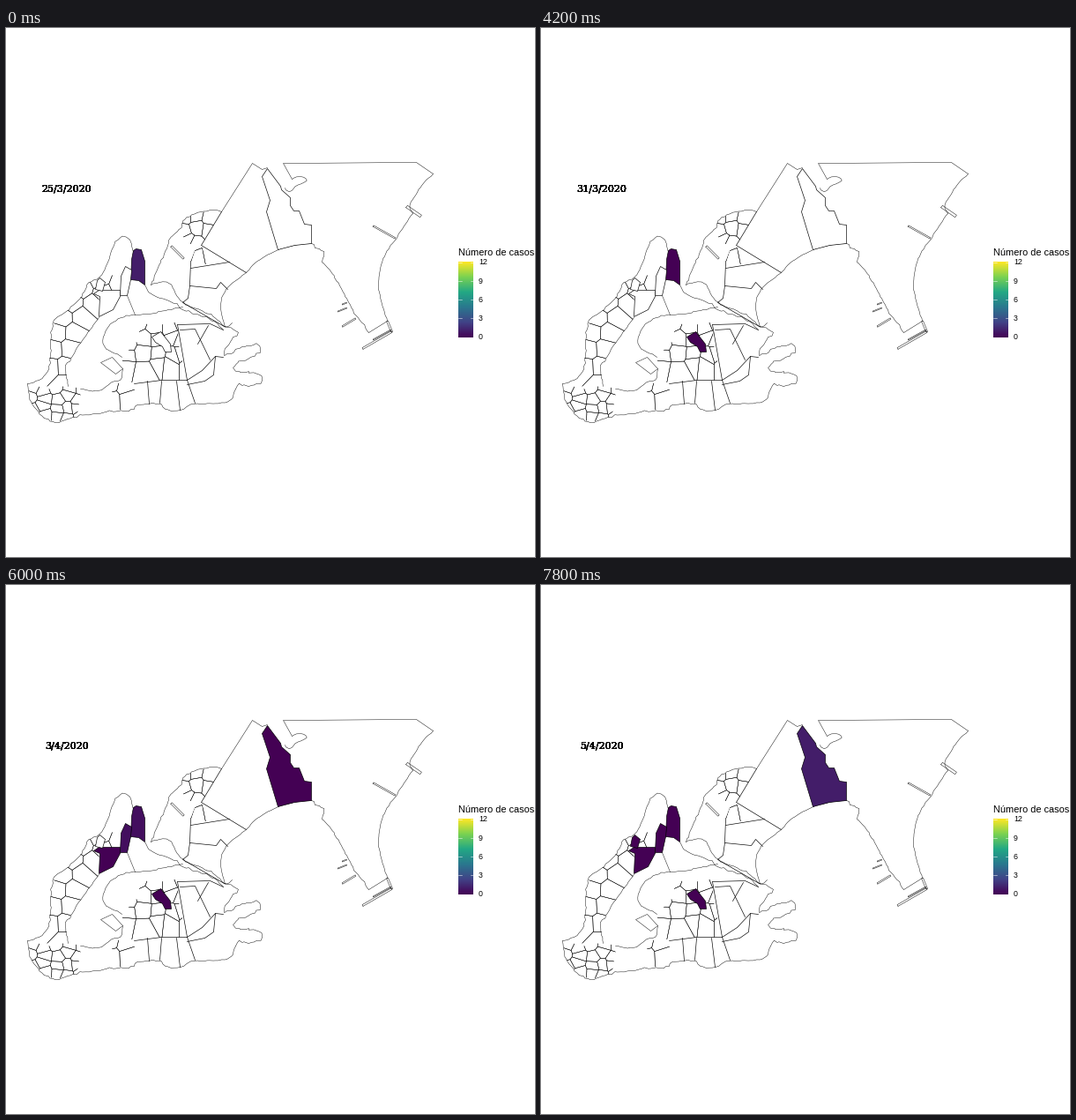
Recreate the animation shown at these times as a matplotlib script. Size 600 by 600 pixels, loop 8 s.

```python
import numpy as np
import matplotlib.pyplot as plt
from matplotlib.animation import FuncAnimation
from matplotlib.colors import LinearSegmentedColormap

PX = 0.72  # points per pixel at 100 dpi
FRAMES, STEP_MS = 40, 200
THIN, FIRM = 0.45 * PX, 0.65 * PX
rng = np.random.default_rng(11)

fig = plt.figure(figsize=(6, 6), dpi=100, facecolor="white")
ax = fig.add_axes([0, 0, 1, 1])


def pts(xy):
    return np.reshape(xy, (-1, 2)).astype(float)


def smooth(p):
    """Catmull-Rom curve through the points."""
    q = np.vstack([p[:1], p, p[-1:]])[:, None]
    a, b, c, d = q[:-3], q[1:-2], q[2:-1], q[3:]
    t = np.linspace(0, 1, 12)[None, :, None]
    s = (2 * b + (c - a) * t + (2 * a - 5 * b + 4 * c - d) * t**2
         + (3 * b - a - 3 * c + d) * t**3) / 2
    return s.reshape(-1, 2)


def resample(p, n):
    run = np.append(0, np.cumsum(np.hypot(*np.diff(p, axis=0).T)))
    at = np.linspace(0, run[-1], n)
    return np.column_stack([np.interp(at, run, p[:, k]) for k in (0, 1)])


def line(*xy, lw=FIRM):
    ax.plot(*pts(xy).T, color="black", lw=lw, zorder=2)


def shore(*xy, rough=0.5):
    """Natural coast: a curve with small seeded wiggles."""
    p = smooth(pts(xy))
    length = np.hypot(*np.diff(p, axis=0).T).sum()
    p = resample(p, int(length / 3.5) + 2)
    p[1:-1] += rng.normal(0, rough, p[1:-1].shape)
    line(*p.ravel(), lw=THIN)


def pier(x0, y0, x1, y1, w=2):
    d = np.array([x1 - x0, y1 - y0])
    n = np.array([-d[1], d[0]]) / np.hypot(*d) * w / 2
    a, b = np.array([x0, y0]), np.array([x1, y1])
    line(*np.ravel([a + n, b + n, b - n, a - n, a + n]), lw=THIN)


def area(*xy, lw=FIRM, z=3):
    return ax.add_patch(plt.Polygon(pts(xy), fc="white", ec="black", lw=lw,
                                    zorder=z))


def cut(poly, mid, normal):
    """Part of a polygon on the inner side of a line."""
    side = (poly - mid) @ normal
    out = []
    for i in range(len(poly)):
        a, b, sa, sb = poly[i - 1], poly[i], side[i - 1], side[i]
        if sa * sb < 0:
            out.append(a + (b - a) * sa / (sa - sb))
        if sb <= 0:
            out.append(b)
    return np.array(out)


def mesh(sites, *xy):
    """Parishes: nearest-site cells, cut off at the zone's outline."""
    zone = area(*xy, lw=0, z=1)
    for s in sites:
        cell = pts((0, 0, 600, 0, 600, 600, 0, 600))
        for o in sites:
            if o is not s:
                cell = cut(cell, (s + o) / 2, o - s)
        patch = ax.add_patch(plt.Polygon(cell, fc="none", ec="black",
                                         lw=THIN, zorder=1.5))
        patch.set_clip_path(zone)


def grid(x0, x1, dx, y0, y1, dy, jitter):
    x, y = np.meshgrid(np.arange(x0, x1, dx), np.arange(y0, y1, dy))
    sites = np.column_stack([x.ravel(), y.ravel()])
    return list(sites + rng.uniform(-jitter, jitter, sites.shape))


# Parishes: western strip, south-western corner, centre, south, north
strip_sites = resample(smooth(pts((122, 288, 96, 300, 66, 345, 58, 398))), 15)
side = (-1.0) ** np.arange(15)[:, None]
strip_sites += side * [8, 5] + rng.uniform(-2, 2, (15, 2))
mesh(list(strip_sites),
     109, 279, 93, 289, 85, 304, 69, 320, 55, 331, 51, 345, 48, 385, 46, 409,
     70, 406, 67, 383, 84, 357, 105, 328, 105, 298, 129, 297, 130, 281)
mesh(grid(31, 86, 13, 409, 446, 11, 4),
     24, 403, 48, 409, 70, 405, 85, 409, 80, 440, 55, 447, 40, 439, 28, 424)
mesh(grid(138, 204, 16, 338, 398, 15, 5),
     147, 326, 163, 338, 194, 333, 196, 364, 205, 399, 176, 399, 145, 403,
     134, 397, 131, 373, 152, 351)
mesh(grid(121, 146, 14, 407, 432, 13, 3),
     118, 402, 145, 403, 146, 428, 124, 434)
mesh(grid(203, 240, 14, 215, 266, 14, 4),
     196, 231, 200, 219, 212, 211, 234, 206, 244, 208, 221, 246, 229, 268,
     209, 264, 216, 246, 207, 244)

# Western land
shore(144, 254, 141, 242, 134, 236, 124, 241, 113, 270, 105, 283, 93, 289,
      85, 304, 69, 320, 55, 331, 51, 345, 48, 385, 37, 399, 24, 403)
shore(24, 403, 28, 424, 40, 439, 55, 447, 80, 440, 124, 434, 143, 433,
      147, 428, 172, 425, 181, 432, 197, 433, 212, 426, 250, 424, 260, 409)
shore(260, 409, 264, 404, 278, 405, 290, 399, 282, 391, 260, 388, 262, 379,
      274, 375, 288, 366, 285, 358, 270, 361, 258, 366, 246, 372, 252, 358,
      262, 344, 247, 338, rough=0.9)
shore(157, 291, 165, 302, 190, 311, 201, 319, 232, 330, 246, 342)
shore(164, 291, 184, 289, 200, 311, 233, 325, 248, 338, 256, 334)
shore(164, 291, 174, 266, 183, 247, 186, 237, 198, 226, 200, 218, 212, 211,
      234, 206, 244, 208)
shore(105, 328, 84, 357, 72, 377, 67, 383, 70, 406, rough=0.3)
shore(200, 316, 160, 324, 134, 326, 113, 342, 111, 360, 131, 373)
shore(84, 409, 104, 411, 118, 402, 130, 398, 132, 386, rough=0.3)
area(107, 379, 120, 373, 132, 386, 124, 392, lw=THIN, z=2)
pier(187, 247, 201, 261)

# Bay and eastern platform
shore(346, 244, 327, 246, 308, 251, 283, 265, 272, 277, 251, 294, 243, 314,
      248, 339, rough=0.2)
shore(346, 244, 360, 255, 358, 264, 366, 273, 381, 297, 388, 311, 398, 327,
      411, 345)
shore(432, 332, 425, 309, 422, 290, 427, 262, 441, 239, 461, 210, rough=0.3)
shore(461, 210, 457, 201, 463, 191, 474, 174, 484, 165, rough=0.3)
shore(324, 171, 334, 168, 341, 173, 327, 180, 322, 186, 316, 181)
line(411, 345, 432, 332, lw=THIN)
line(484, 165, 465, 152, 314, 153, 324, 171, lw=THIN)
pier(416, 224, 441, 238, 1.5)
pier(454, 202, 470, 213, 3)
pier(404, 363, 437, 344)
pier(437, 344, 432, 332)
pier(416, 353, 436, 342, 1)
pier(376, 321, 386, 317, 1)
pier(381, 313, 386, 311, 1)
pier(381, 338, 396, 329, 1.5)

# Long straight borders
line(244, 208, 279, 153, 290, 160, 296, 158, lw=THIN)
line(244, 208, 221, 246, 272, 277)
line(209, 264, 208, 292, 206, 306, 200, 311, 247, 338)
line(209, 272, 253, 265)
line(208, 292, 238, 295, 243, 288, 251, 296)
line(137, 303, 146, 325, lw=THIN)
line(194, 336, 205, 399, 214, 425)
line(194, 336, 231, 335, 246, 342)
line(197, 342, 214, 341, 231, 376)
line(229, 337, 217, 358)
line(246, 373, 237, 372, 222, 388, 205, 399)
line(237, 372, 235, 393, 225, 400, 205, 404)
line(145, 403, 176, 399, 205, 399)
for top, foot, y in ((160, 162, 426), (176, 174, 425), (193, 197, 433)):
    line(top, 400, foot, y)

# Districts that take a colour
cape = area(147, 250, 153, 251, 157, 264, 157, 291, 150, 286, 141, 285,
            142, 262, 144, 252)
neck = area(135, 270, 142, 274, 141, 285, 137, 303, 129, 303, 130, 281)
slope = area(105, 297, 129, 297, 129, 304, 121, 319, 105, 327, 106, 304,
             99, 301)
knob = area(106, 283, 112, 288, 109, 298, 101, 296, 103, 286)
core = area(165, 350, 175, 344, 186, 358, 187, 367, 180, 367, 177, 361,
            169, 356)
strip = area(296, 159, 290, 168, 299, 195, 295, 208, 308, 251, 327, 246,
             346, 244, 346, 223, 338, 222, 332, 207, 326, 207, 322, 201,
             322, 192, 312, 183, 311, 179)

# Legend: gradient through six evenly spaced tones
tones = LinearSegmentedColormap.from_list(
    "tones", plt.get_cmap("viridis")(np.linspace(0, 1, 6)))
ax.imshow(np.linspace(1, 0, 256)[:, None], cmap=tones, aspect="auto",
          extent=(512.5, 529.5, 350.5, 264.5), zorder=1)
ax.set(xlim=(-0.5, 599.5), ylim=(599.5, -0.5))
ax.axis("off")
ax.text(512.5, 257.7, "Número de casos", family="Liberation Sans",
        size=11 * PX)
for n in range(0, 13, 3):
    y = 350 - n * 85 / 12
    ax.text(535.5, y + 2.9, str(n), family="Liberation Sans", size=8.8 * PX)
    for x in (512.5, 526):
        ax.plot([x, x + 3.5], [y, y], color="white", lw=0.5 * PX, zorder=3)

# Stacked copies give the date its hard, heavy edges
labels = [ax.text(68.2, 185.4, "", family="DejaVu Serif", size=11 * PX,
                  ha="center") for _ in range(12)]


def cases(n):
    return tones(n / 12)


GREY = "#45466e"
DATES = ["25/3", "26/3", "27/3", "28/3", "28/3", "29/3", "30/3", "31/3",
         "1/4", "2/4", "3/4", "3/4", "4/4", "5/4"]
# District -> {step: fill from that step on}
FILLS = {
    cape: {0: cases(1), 1: cases(0), 10: cases(0.5), 12: cases(0)},
    core: {6: cases(1), 7: cases(0)},
    strip: {8: cases(1), 9: cases(0), 11: GREY, 12: cases(5), 13: cases(1)},
    slope: {9: cases(2), 10: cases(0)},
    neck: {10: cases(0.5), 12: cases(0)},
    knob: {12: cases(1), 13: cases(0)},
}


def draw(i):
    step = i * STEP_MS // 600
    for label in labels:
        label.set_text(DATES[step] + "/2020")
    for patch, fills in FILLS.items():
        past = [s for s in fills if s <= step]
        patch.set_facecolor(fills[max(past)] if past else "white")
    return labels + list(FILLS)


anim = FuncAnimation(fig, draw, frames=FRAMES, interval=STEP_MS, repeat=True,
                     repeat_delay=0, blit=False)
plt.show()
```
